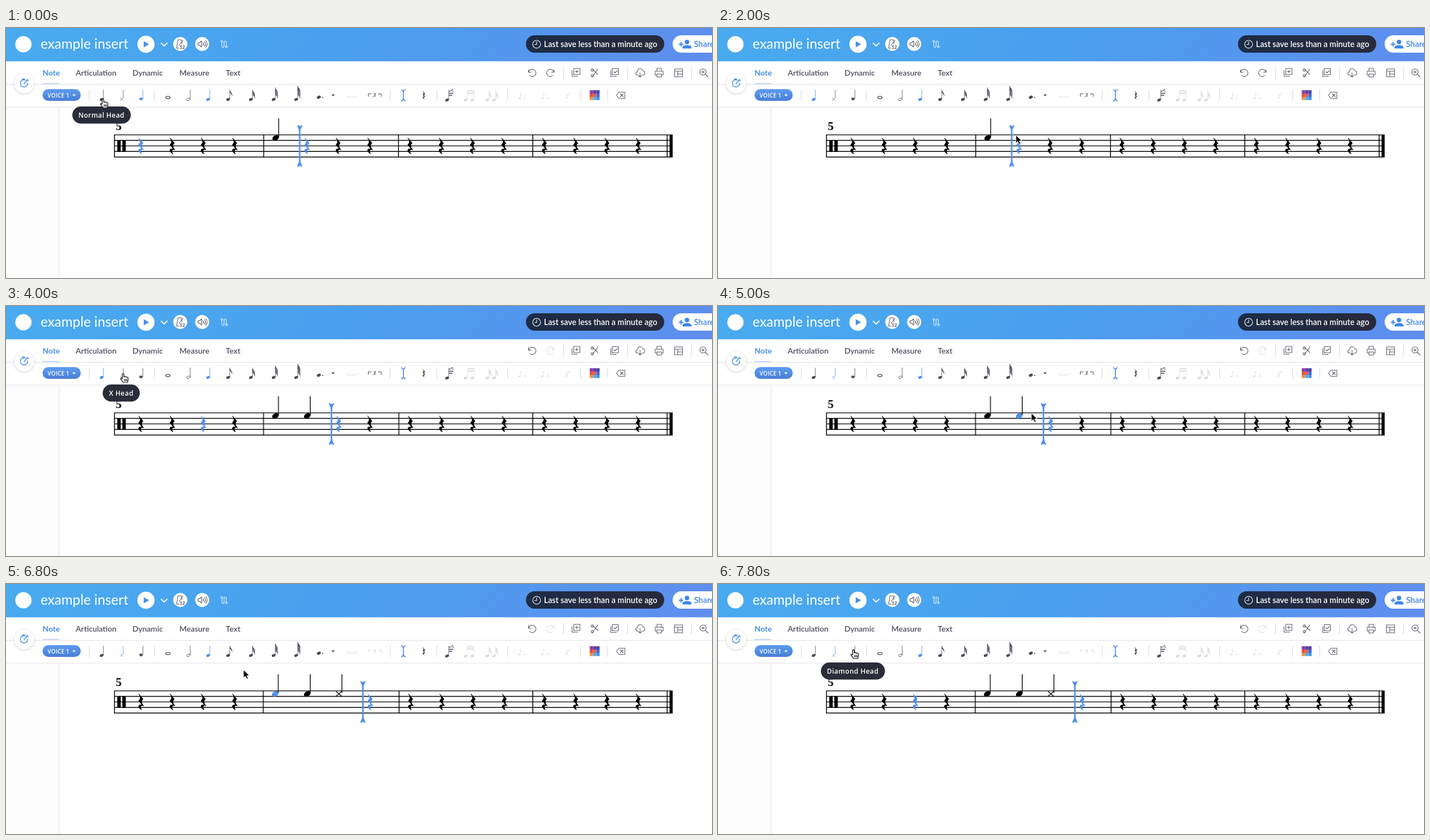
An HTML page for the animation above (8000 ms loop, 1256 by 446 pixels).

```html
<!DOCTYPE html>
<html lang="en">
<head>
<meta charset="utf-8">
<title>Drum notation editor</title>
<style>
:root { --blue: #4f8fea; --dark: #4a4a5a; --faint: #dcdce0; }
html, body { margin: 0; width: 100%; height: 100%; overflow: hidden; background: #fff; }
svg { display: block; width: 100%; height: 100%; }
text { font-family: Lato, "Open Sans", sans-serif; }
.open { font-family: "Open Sans", "Noto Sans", sans-serif; font-weight: 600; }
.tabs { font-size: 13.9px; font-weight: 600; fill: #4e4e62; }
.line { fill: none; stroke: #5a5a68; stroke-width: 1.1; stroke-linecap: round; stroke-linejoin: round; }
.bar { stroke: #000; stroke-width: 1.5; }
.sep { stroke: #d6d6dc; stroke-width: 1; }
.tools { color: var(--dark); }
.tools .on { color: var(--blue); }
.tools .off { color: var(--faint); }
.tip rect { fill: #2a2c39; }
.tip text { fill: #fff; font-size: 12px; letter-spacing: .45px; text-anchor: middle; }

/* everything changes in hard steps */
.anim, .anim * { animation-duration: 8s; animation-iteration-count: infinite; animation-timing-function: step-end; }

/* score items lit by the pointer */
.rest1 { animation-name: rest1; }
.rest2 { animation-name: rest2; }
.rest3 { animation-name: rest3; }
.rest4 { animation-name: rest4; }
.note1 { animation-name: note1; }
.note2 { animation-name: note2; }
.note3 { animation-name: note3; }
@keyframes rest1 { 0% { color: var(--blue) } 10% { color: #000 } }
@keyframes rest2 { 10% { color: var(--blue) } 12.5% { color: #000 } }
@keyframes rest3 { 40%, 90% { color: var(--blue) } 57.5% { color: #000 } }
@keyframes rest4 { 12.5%, 37.5%, 57.5%, 87.5% { color: var(--blue) } 15%, 40%, 60%, 90% { color: #000 } }
@keyframes note1 { 15%, 35%, 60%, 85% { color: var(--blue) } 17.5%, 37.5%, 62.5%, 87.5% { color: #000 } }
@keyframes note2 { 32.5%, 62.5%, 82.5% { color: var(--blue) } 35%, 65%, 85% { color: #000 } }
@keyframes note3 { 80% { color: var(--blue) } 82.5% { color: #000 } }

/* the two insertions; the bar widens a little each time */
.after1 { animation-name: after1; }
.after2 { animation-name: after2; }
.until1 { animation-name: until1; }
.until2 { animation-name: until2; }
.caret { animation-name: caret; }
.widenLeft { animation-name: widenLeft; }
.widenRight { animation-name: widenRight; }
@keyframes after1 { 0% { opacity: 0 } 32.5% { opacity: 1 } }
@keyframes after2 { 0% { opacity: 0 } 80% { opacity: 1 } }
@keyframes until1 { 32.5% { opacity: 0 } }
@keyframes until2 { 80% { opacity: 0 } }
@keyframes caret {
  0% { transform: translateX(522.5px) }
  32.5% { transform: translateX(579px) }
  80% { transform: translateX(635px) }
}
@keyframes widenLeft { 32.5% { transform: translateX(-.4px) } 80% { transform: translateX(-.8px) } }
@keyframes widenRight { 32.5% { transform: translateX(.6px) } 80% { transform: translateX(1.1px) } }

/* toolbar states */
.normal { animation-name: normal; }
.cross { animation-name: cross; }
.diamond { animation-name: diamond; }
.redo { animation-name: redo; }
.tuplet { animation-name: tuplet; }
@keyframes normal { 5% { color: var(--blue) } 52.5% { color: var(--dark) } }
@keyframes cross { 52.5% { color: var(--blue) } }
@keyframes diamond { 0% { color: var(--blue) } 5% { color: var(--dark) } }
@keyframes redo { 32.5% { stroke: var(--faint) } }
@keyframes tuplet { 80% { color: var(--faint) } }

.tipNormal { animation-name: tipNormal; }
.tipCross { animation-name: tipCross; }
.tipDiamond { animation-name: tipDiamond; }
@keyframes tipNormal { 7.5% { opacity: 0 } }
@keyframes tipCross { 0%, 55% { opacity: 0 } 45% { opacity: 1 } }
@keyframes tipDiamond { 0% { opacity: 0 } 95% { opacity: 1 } }

/* pointer */
.hand { animation-name: hand; }
.arrow { animation-name: arrow; }
.pointer { animation-name: pointer; }
@keyframes hand { 7.5%, 55% { opacity: 0 } 42.5%, 92.5% { opacity: 1 } }
@keyframes arrow { 0%, 42.5%, 92.5% { opacity: 0 } 7.5%, 55% { opacity: 1 } }
@keyframes pointer {
  0% { transform: translate(172.5px, 126.5px) }
  7.5% { transform: translate(200px, 136px) }
  10% { transform: translate(305px, 158px) }
  12.5% { transform: translate(417px, 173px) }
  15% { transform: translate(485px, 183px) }
  17.5% { transform: translate(520px, 189px) }
  20% { transform: translate(530px, 191px) }
  32.5% { transform: translate(515px, 186px) }
  35% { transform: translate(445px, 165px) }
  37.5% { transform: translate(354.5px, 142px) }
  40% { transform: translate(275px, 128px) }
  42.5% { transform: translate(222px, 121px) }
  45% { transform: translate(208.5px, 120.5px) }
  55% { transform: translate(250px, 135px) }
  57.5% { transform: translate(360px, 162px) }
  60% { transform: translate(475px, 183px) }
  62.5% { transform: translate(557.5px, 191px) }
  65% { transform: translate(585px, 192px) }
  67.5% { transform: translate(590px, 191px) }
  80% { transform: translate(575px, 186px) }
  82.5% { transform: translate(510px, 172px) }
  85% { transform: translate(422.5px, 153px) }
  87.5% { transform: translate(340px, 138px) }
  90% { transform: translate(275px, 124px) }
  92.5% { transform: translate(246px, 118px) }
  95% { transform: translate(241px, 117px) }
}
</style>
</head>
<body>
<svg viewBox="0 0 1256 446">
<defs>
  <linearGradient id="sky" gradientUnits="userSpaceOnUse" x1="299" y1="-299" x2="957" y2="359">
    <stop offset="0" stop-color="#49abef"/><stop offset=".5" stop-color="#4a9fee"/><stop offset="1" stop-color="#608dee"/>
  </linearGradient>
  <linearGradient id="pill" x2="0" y2="1"><stop offset="0" stop-color="#5c9cf0"/><stop offset="1" stop-color="#4a7fd6"/></linearGradient>
  <linearGradient id="night" x2="1"><stop offset="0" stop-color="#1d2c46"/><stop offset="1" stop-color="#272a3c"/></linearGradient>
  <linearGradient id="drop" x2="0" y2="1"><stop offset="0" stop-color="#ededf0"/><stop offset="1" stop-color="#fff" stop-opacity="0"/></linearGradient>
  <linearGradient id="edge"><stop offset="0" stop-color="#fdfdfd"/><stop offset="1" stop-color="#f0f0f2"/></linearGradient>
  <filter id="soft" x="-50%" y="-50%" width="200%" height="200%"><feDropShadow dx="0" dy="1" stdDeviation="2" flood-color="#000" flood-opacity=".22"/></filter>

  <path id="rest" fill="currentColor" d="M-3.6-14.8 4.2-5.2C.6-1.2.8 1.4 5.6 7.2.6 5.4-2 8.2 1.8 13.8L1.2 14.6C-6.6 9.6-6 3.6 1.2 4.8L-4.6-2.2C-.4-6.2-.8-9-4.4-14.2Z"/>
  <ellipse id="blob" rx="6.3" ry="4.3" fill="currentColor" transform="rotate(-25)"/>
  <path id="stem" d="M5.3-35V-2" stroke="#000" stroke-width="1.4"/>
  <g id="quarter">
    <ellipse rx="3.5" ry="2.4" fill="currentColor" transform="translate(-.8 7.4) rotate(-25)"/>
    <path d="M2.2-9.8V6.6" stroke="currentColor" stroke-width=".8"/>
  </g>
  <path id="flag" fill="currentColor" d="M2-10C2.6-5.6 8.4-4 6 3 6.2-1.2 4-3.4 2-5Z"/>
  <g id="eighth"><use href="#quarter"/><use href="#flag"/></g>
  <g id="sixteenth"><use href="#eighth"/><use href="#flag" y="4"/></g>
  <g id="thirtysecond"><use href="#sixteenth"/><use href="#flag" y="-4"/><path d="M2.2-14V-8" stroke="currentColor" stroke-width=".8"/></g>
  <g id="sixtyfourth"><use href="#thirtysecond"/><use href="#flag" y="-7"/><path d="M2.2-17V-8" stroke="currentColor" stroke-width=".8"/></g>
</defs>

<!-- page -->
<rect y="140" width="95" height="306" fill="#fdfdfd"/>
<rect x="91" y="140" width="5" height="306" fill="url(#edge)"/>

<!-- score -->
<g class="anim" color="#000">
  <path d="M193 190.6H1186M193 200.5H1186M193 210.4H1186M193 220.3H1186M193 230.2H1186" stroke="#000" stroke-width="1.4"/>
  <path class="bar" d="M193 190V231M937.2 190V231M1176.2 190V231"/>
  <path d="M1180.5 190h5.5v41h-5.5zM198 200.5h6v20h-6zM207 200.5h6v20h-6z"/>
  <text x="195.3" y="181.5" style="font: bold 21px 'Liberation Serif', serif">5</text>

  <use class="rest1" href="#rest" x="240" y="210.5"/>
  <use class="rest2" href="#rest" x="295.7" y="210.5"/>
  <use class="rest3" href="#rest" x="351" y="210.5"/>
  <use class="rest4" href="#rest" x="406.8" y="210.5"/>

  <g class="widenLeft">
    <path class="bar" d="M458.5 190V231"/>
    <g transform="translate(479.8 196)"><use class="note1" href="#blob"/><use href="#stem"/></g>
  </g>
  <g class="after1"><g transform="translate(536 196)"><use class="note2" href="#blob"/><use href="#stem"/></g></g>
  <g class="after2"><g transform="translate(592.3 196)">
    <path class="note3" d="M-5.3-4.6 5.3 4.6M-5.3 4.6 5.3-4.6" stroke="currentColor" stroke-width="1.3"/><use href="#stem"/>
  </g></g>
  <use class="until1" href="#rest" x="591" y="210.5"/>
  <use class="until2" href="#rest" x="647.3" y="210.5"/>

  <g class="widenRight">
    <path class="bar" d="M698.3 190V231"/>
    <use href="#rest" x="718.8" y="210.5"/><use href="#rest" x="774.4" y="210.5"/>
    <use href="#rest" x="830" y="210.5"/><use href="#rest" x="885.6" y="210.5"/>
  </g>
  <use href="#rest" x="958" y="210.5"/><use href="#rest" x="1013.6" y="210.5"/>
  <use href="#rest" x="1069.2" y="210.5"/><use href="#rest" x="1124.8" y="210.5"/>

  <g class="caret" color="#4f8fea">
    <path fill="currentColor" d="M-4.6 173 0 175 4.6 173C4 178 1.4 179 1.4 183V237.500C1.4 241 4 243 4.6 248L0 246-4.6 248C-4 243-1.4 241-1.4 237.500V183C-1.4 179-4 178-4.6 173Z"/>
    <use href="#rest" x="13" y="210.5"/>
  </g>
</g>

<!-- toolbars -->
<rect y="59" width="1256" height="81" fill="#fff"/>
<rect y="140" width="1256" height="6" fill="url(#drop)"/>
<path class="sep" d="M0 100.5H1256" opacity=".75"/>
<path d="M65 99H95" stroke="#bcd2f5" stroke-width="1.6"/>

<!-- header -->
<rect width="1256" height="59.4" fill="url(#sky)"/>
<circle cx="31" cy="29" r="14.5" fill="#fff"/>
<text x="61.5" y="37" font-size="24.4" fill="#fff">example insert</text>
<g fill="#fff">
  <circle cx="249" cy="29" r="15.3"/><circle cx="310" cy="28.5" r="12.5"/><circle cx="349" cy="28.5" r="12.5"/>
</g>
<path d="M245 23.5 254.5 29 245 34.5Z" fill="#4a8fe8"/>
<path class="line" style="stroke:#fff;stroke-width:1.8" d="M276 27l5.3 5 5.3-5"/>
<path class="line" d="M308 36H303.5L306 21h6l1.3 7M308 31l7-9"/>
<text x="309" y="37" font-size="8" font-weight="700" fill="#454552">12</text>
<path class="line" d="M341.5 26.5h2.5l4-3.5v11l-4-3.5h-2.5zM350.5 26q2 2.5 0 5M353 24q3.5 4.5 0 9M355.5 22.5q4.5 6 0 12"/>
<g class="line" style="stroke:#fff;stroke-width:1">
  <path d="M384 26v6q0 3 2 3t2-3v-6q0-3 2-3t2 3v6"/>
  <circle cx="384" cy="24" r="1.7"/><circle cx="392" cy="33.7" r="1.7"/>
</g>
<rect x="925" y="13" width="246" height="31" rx="15.5" fill="url(#night)"/>
<g class="line" style="stroke:#fff"><circle cx="944" cy="29" r="7"/><path d="M944 24.5V29.5H940.5"/></g>
<text x="957" y="34" font-size="14.3" font-weight="600" fill="#fff">Last save less than a minute ago</text>
<rect x="1186" y="13" width="100" height="31" rx="15.5" fill="#fff"/>
<g fill="#3f86e6">
  <path d="M1197 28h3v-3h2v3h3v2h-3v3h-2v-3h-3z"/><circle cx="1211.5" cy="25" r="4"/><path d="M1203.5 36.500v-2c0-5.500 16-5.500 16 0v2z"/>
  <text x="1224" y="34" font-size="14.5" font-weight="600">Share</text>
</g>

<!-- tabs -->
<g class="tabs">
  <text x="65" y="84.5" style="fill:#4a8fe8;font-weight:700">Note</text>
  <text x="124" y="84.5">Articulation</text>
  <text x="225" y="84.5">Dynamic</text>
  <text x="308.5" y="84.5">Measure</text>
  <text x="391" y="84.5">Text</text>
</g>
<path class="sep" d="M991.5 70v20M1105.5 70v20M1219.5 70v20"/>
<g class="line anim">
  <path d="M929.5 74v5h5M930 78.500a6.500 6.500 0 1 1 1.500 6"/>
  <path class="redo" d="M975 74v5h-5M974.5 78.500a6.500 6.500 0 1 0-1.500 6"/>
  <path d="M1010 72h11v11h-11zM1007 76v10h10M1015.5 75v5M1013 77.500h5"/>
  <path d="M1043 73l10 10M1043 87l10-14"/><circle cx="1043" cy="75" r="2"/><circle cx="1043" cy="85" r="2"/>
  <path d="M1078.5 72.500h11v11h-11zM1076 76v10.500h10M1081.5 78l2 2 4-4"/>
  <path d="M1124.5 84h-1c-4 0-4-6 0-6 0-7 9-7 9.500-1.500 4.500 0 4 7.500.5 7.500h-2M1128 79v8M1125.5 85l2.500 2.500 2.500-2.500"/>
  <path d="M1158 77v-5h8v5M1158 84h-3v-7h14v7h-3M1158 82h8v5.500h-8z"/>
  <path d="M1189.5 73h14v14h-14zM1189.5 77h14M1195 77v10M1195 82h8.500"/>
  <circle cx="1240" cy="78.5" r="5.5"/><path d="M1244 82.500l5 5M1237.5 78.500h5M1240 76v5"/>
</g>

<!-- voice picker and timer -->
<circle cx="32.5" cy="99" r="17.5" fill="#fff" filter="url(#soft)"/>
<path class="line" style="stroke:#4a8fe8;stroke-width:1.5" d="M37 94.500a6.500 6.500 0 1 0 1.500 3.500M32 99.500l6.500-7M37.5 91.500l2.500 2.500M29 91h4"/>
<rect x="65" y="109" width="68" height="21" rx="10.5" fill="url(#pill)"/>
<text class="open" x="74" y="123.5" font-size="10" letter-spacing=".2" fill="#fff">VOICE 1</text>
<path d="M118 118.500h6l-3 3.500z" fill="#fff"/>

<!-- note tools -->
<path class="sep" d="M148 110v20M264 110v20M683.5 110v20M766.5 110v20M892.5 110v20M1022.5 110v20M1070.5 110v20"/>
<g class="tools anim">
  <use class="normal" href="#quarter" x="171" y="120"/>
  <path class="cross" d="M208.5 110.500V125M203 124.500l5.500 5.500M203 130l5.500-5.500" fill="none" stroke="currentColor" stroke-width=".7"/>
  <g class="diamond"><path d="M236.5 126.500l3.700-3 3.700 3-3.700 3z" fill="currentColor"/><path d="M243.5 110.500V126.500" stroke="currentColor" stroke-width=".8"/></g>
  <ellipse cx="288" cy="124" rx="3.8" ry="2.1" fill="none" stroke="currentColor" stroke-width="1.4"/>
  <g fill="none" stroke="currentColor" stroke-width=".8"><ellipse rx="3.3" ry="2" transform="translate(324.5 127.3) rotate(-25)"/><path d="M327.8 110V126.500"/></g>
  <use class="on" href="#quarter" x="360.5" y="120"/>
  <use href="#eighth" x="396" y="120"/>
  <use href="#sixteenth" x="436.5" y="120"/>
  <use href="#thirtysecond" x="477" y="120"/>
  <use href="#sixtyfourth" x="517" y="120"/>
  <ellipse rx="3.7" ry="2.6" fill="currentColor" transform="translate(556.5 123.5) rotate(-25)"/>
  <circle cx="563.5" cy="123.8" r="1.1" fill="currentColor"/>
  <path d="M579 118.500h6l-3 3.500z" fill="currentColor"/>
  <path class="off" d="M605 121q10.500 5 21 0" fill="none" stroke="currentColor"/>
  <g class="tuplet">
    <path d="M644.5 122.500v-5h5.500M662 117.500h5.500v5" fill="none" stroke="currentColor"/>
    <text x="652.5" y="123" fill="currentColor" style="font: italic bold 11px 'Liberation Serif', serif">3</text>
  </g>
  <path class="on" d="M703 110q3.500 1 4 4 .5-3 4-4M707 113v14M703 130q3.500-1 4-4 .5 3 4 4" fill="none" stroke="currentColor" stroke-width="1.7"/>
  <use href="#rest" transform="translate(743.5 120) scale(.5)"/>
  <use href="#quarter" x="785.5" y="121"/>
  <path d="M788 112.500h3M788 116.500h8M788 120h6M792 112l3-3M794.5 113.500l2-1" stroke="currentColor" stroke-width="1.3"/>
  <g class="off">
    <use href="#quarter" x="818.5" y="121"/><use href="#quarter" x="830.5" y="121"/>
    <path d="M821 112h12M821 116h12" stroke="currentColor" stroke-width="2"/>
    <use href="#sixteenth" x="857" y="121"/><use href="#sixteenth" x="869" y="121"/>
    <use href="#eighth" transform="translate(914 121) scale(.6)"/><use href="#quarter" transform="translate(923 122) scale(.45)"/>
    <use href="#eighth" transform="translate(954.5 121) scale(.6)"/><use href="#quarter" transform="translate(963.5 122) scale(.45)"/>
    <use href="#eighth" transform="translate(998 121) scale(.5)"/><path d="M994 123l11-7" stroke="currentColor"/>
  </g>
</g>
<g>
  <path fill="#8a3fa6" d="M1038.5 111h6v6h-6z"/><path fill="#6a3fa6" d="M1044.5 111h6v6h-6z"/><path fill="#4a46a8" d="M1050.5 111h5.5v6h-5.5z"/>
  <path fill="#e2513f" d="M1038.5 117h6v6h-6z"/><path fill="#e0605a" d="M1044.5 117h6v6h-6z"/><path fill="#3f6ed8" d="M1050.5 117h5.5v6h-5.5z"/>
  <path fill="#f0913a" d="M1038.5 123h6v5.500h-6z"/><path fill="#4ab0ea" d="M1044.5 123h6v5.500h-6z"/><path fill="#4a90ea" d="M1050.5 123h5.5v5.500h-5.5z"/>
</g>
<path class="line" d="M1086 120l4.500-5.500h10.500v11h-10.500zM1093 117.500l5 5M1093 122.500l5-5"/>

<!-- tooltips -->
<g class="tip anim">
  <g class="tipNormal"><rect x="118" y="140" width="104" height="30.5" rx="15.2"/><text class="open" x="169.7" y="159.5">Normal Head</text></g>
  <g class="tipCross"><rect x="172" y="140" width="66" height="30.5" rx="15.2"/><text class="open" x="205" y="159.5">X Head</text></g>
  <g class="tipDiamond"><rect x="183" y="140" width="114" height="30.5" rx="15.2"/><text class="open" x="239.7" y="159.5">Diamond Head</text></g>
</g>

<g class="anim"><g class="pointer" stroke-linejoin="round">
  <path class="arrow" d="M0 0V14.500L3.400 11.400 5.800 16.600 8.300 15.500 6 10.500H10.500Z" stroke="#fff"/>
  <path class="hand" fill="#fff" stroke="#000" stroke-width="1.2" d="M-1.5 9.500V1.500a1.400 1.400 0 0 1 2.800 0V6c.5-1.300 2.500-1.100 2.600.3.600-1 2.400-.7 2.500.6.800-.8 2.300-.3 2.300 1.100V11.500L7.500 16H.5L-4.200 10.200c-.9-1.500.8-2.400 1.700-1.500ZM2.200 10v3.500M4.300 10v3.500M6.400 10v3.500"/>
</g></g>
</svg>
</body>
</html>
```
